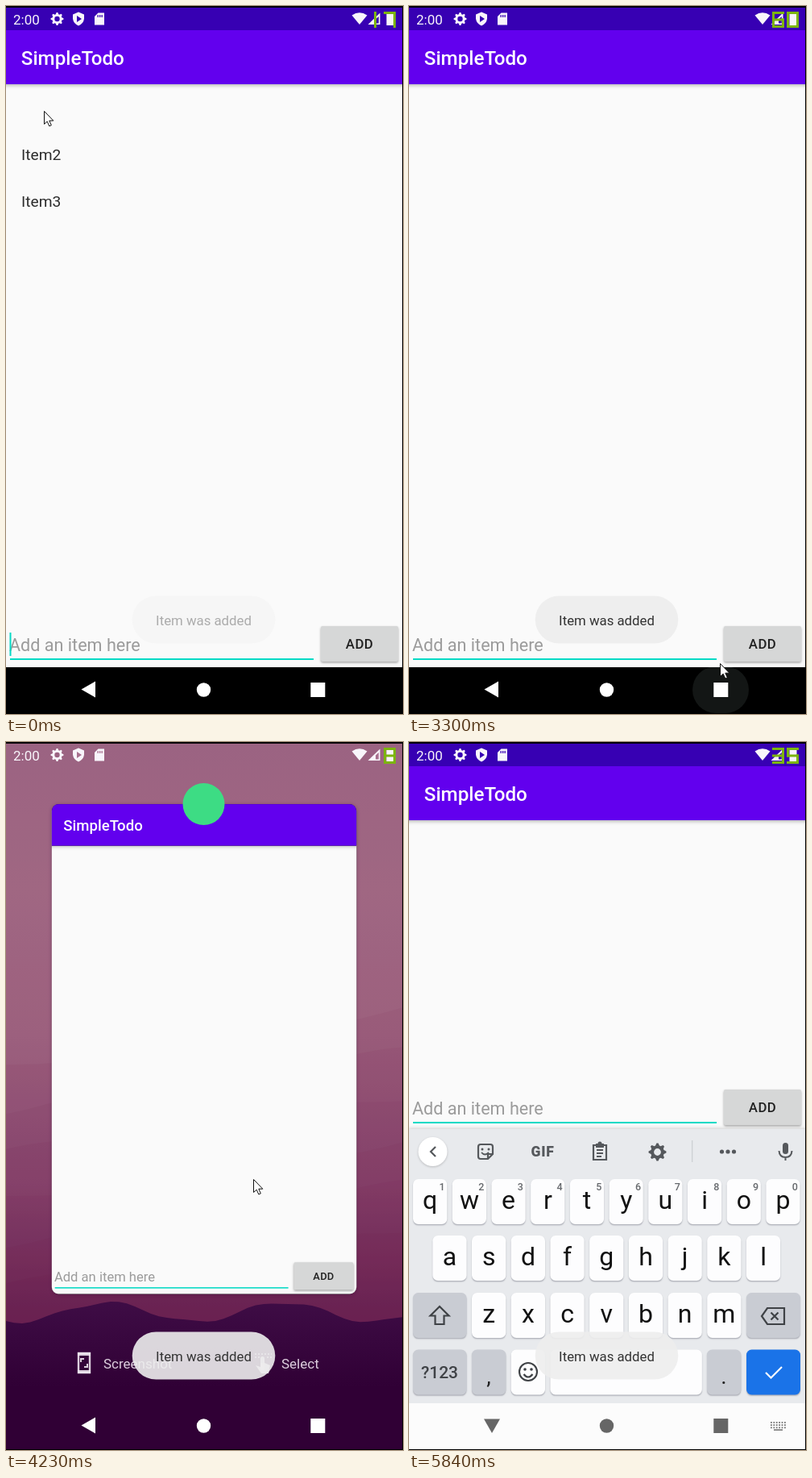
An HTML page with a canvas that plays this animation: 493 px wide and 878 px high, repeating every 5940 ms.

```html
<!DOCTYPE html>
<html lang="en">
<head>
<meta charset="utf-8">
<title>Todo list demo</title>
<style>
html, body { margin: 0; width: 100%; height: 100%; overflow: hidden; background: #000; }
canvas { display: block; }
</style>
</head>
<body>
<canvas id="stage" width="493" height="878"></canvas>
<script>
const ctx = document.getElementById('stage').getContext('2d');
// The screen refreshes in equal steps; all times below count steps.
const LOOP = 5940, STEP = 135;
const TEAL = '#03dac5', PURPLE = '#6200ee', DARK = '#3700b3', PAPER = '#fafafa', ICON = '#55585c';
const KEYS_UP = 34, ROW_UP = 35;
const COUNTS = ['17', '29', '62', '60', ' 8', '59', '35'];
// Pointer rests: first step, last step, x, y.
const RESTS = [[0, 1, 47, 130], [2, 9, 48, 125], [12, 16, 51, 128], [17, 17, 162, 280],
  [22, 26, 386, 815], [28, 34, 307, 542], [40, 40, 457, 850]];

const ramp = (n, a, b) => Math.min(1, Math.max(0, (n - a) / (b - a)));
const easeOut = u => 1 - (1 - u) ** 2;
const slide = (n, from) => 57.4 * easeOut(ramp(n, from, from + 2));
const blink = (n, from) => Math.floor((n - from) / 3.5) % 2 === 0;

// --- drawing helpers ---
function rect(x, y, w, h, color) { ctx.fillStyle = color; ctx.fillRect(x, y, w, h); }

function round(x, y, w, h, r, color) {
  ctx.beginPath(); ctx.roundRect(x, y, w, h, r);
  ctx.fillStyle = color; ctx.fill();
}

function disc(x, y, r, color) {
  ctx.beginPath(); ctx.arc(x, y, r, 0, 7);
  ctx.fillStyle = color; ctx.fill();
}

function shape(path, color) { ctx.fillStyle = color; ctx.fill(new Path2D(path)); }

function line(path, color, width = 2) {
  ctx.strokeStyle = color; ctx.lineWidth = width;
  ctx.stroke(new Path2D(path));
}

function text(str, x, y, size, color, { weight = 400, align = 'left', gap = 0 } = {}) {
  ctx.font = `${weight} ${size}px Roboto, sans-serif`;
  ctx.letterSpacing = gap + 'px';
  ctx.textAlign = align; ctx.fillStyle = color;
  ctx.fillText(str, x, y);
}

function at(x, y, draw) { ctx.save(); ctx.translate(x, y); draw(); ctx.restore(); }

function faded(alpha, draw) { ctx.save(); ctx.globalAlpha = alpha; draw(); ctx.restore(); }

function shadowed(color, blur, dy, draw) {
  ctx.save();
  ctx.shadowColor = color; ctx.shadowBlur = blur; ctx.shadowOffsetY = dy;
  draw(); ctx.restore();
}

function gear(x, y, r, color) {
  ctx.beginPath();
  for (let i = 0; i < 32; i++) {
    const a = (i - .5) * Math.PI / 16, k = i % 4 < 2 ? r : r * .76;
    ctx.lineTo(x + k * Math.cos(a), y + k * Math.sin(a));
  }
  ctx.closePath();
  ctx.moveTo(x + r * .4, y); ctx.arc(x, y, r * .4, 0, 7);
  ctx.fillStyle = color; ctx.fill('evenodd');
}

// --- status bar ---
function statusBar(under) {
  const c = '#f8f5fb';
  text('2:00', 9, 22.5, 17, c);
  gear(63.5, 16, 8, c);
  shape('M90 7.5L97 10.5V16Q96 22 90 24.5Q84 22 83 16V10.5Z', c);
  shape('M88 12L94 16L88 20Z', under);
  shape('M114.5 8.5H122V23.5H110V13Z', c);
  for (let i = 0; i < 3; i++) rect(113.5 + i * 2.5, 11, 1.3, 3, under);
  shape('M439 23L429.5 11.5Q439 5 448.5 11.5Z', c);
  shape('M464.5 8.5V23H449.5Z', c);
  shape('M462.8 13V21.5H459V16.5Z', under);
  rect(475, 8, 4, 2, c);
  rect(472.5, 9.5, 9, 14.5, c);
}

// Lit segments: 0, 3, 6 are bars from top to bottom, 1-2 and 4-5 the left and right sides.
const LIT = { 0: '012456', 2: '02346', 3: '02356', 5: '01356', 6: '013456', 7: '025', 8: '0123456', 9: '012356' };

function counter(str) {
  const c = '#7cb50e';
  [...str].forEach((d, i) => {
    const x = 451 + i * 18;
    if (d === '1') rect(457, 7, 3, 20, c);
    for (const s of LIT[d] || '') {
      const side = s % 3, y = 7 + Math.floor(s / 3) * 8.5;
      if (side) rect(x + (side - 1) * 12, y, 3, 11.5, c);
      else rect(x, y, 15, 3, c);
    }
  });
}

// --- app screen ---
function inputRow(dy, caret) {
  at(0, dy, () => {
    text('Add an item here', 4, 800, 21.6, '#9b9b9b');
    rect(5, 809, 377, 2, TEAL);
    if (caret) rect(4.5, 777, 2, 29, TEAL);
    shadowed('rgba(0,0,0,.35)', 3, 1.5, () => round(391, 769, 96, 44, 2, '#d6d7d7'));
    text('ADD', 439, 797, 16.8, '#212121', { weight: 500, align: 'center', gap: .4 });
  });
}

function app(n) {
  rect(0, 0, 493, 878, '#000');
  rect(0, 97, 493, 723, PAPER);
  shadowed('rgba(0,0,0,.25)', 4, 1.5, () => rect(-8, 30, 509, 67, PURPLE));
  rect(0, 0, 493, 30, DARK);
  text('SimpleTodo', 18.8, 73, 24.2, '#fff', { weight: 500 });
  const ink = '#2c2c2c';
  faded(1 - ramp(n, 7, 9), () => text('Item2', 19, 191 - slide(n, 0), 19.2, ink));
  if (n < 16) text('Item3', 19, 248.5 - slide(n, 0) - slide(n, 8), 19.2, ink);
  if (n < KEYS_UP) inputRow(0, n < 24 && blink(n, -1));
  else if (n >= ROW_UP) inputRow(-338, !blink(n, 36));
}

// --- system navigation ---
function navIcons(color, turn) {
  at(103, 847.5, () => {
    ctx.rotate(turn);
    shape('M-9.5 0L8 -10V10Z', color);
  });
  disc(245.5, 848, 8.7, color);
  rect(378.3, 839, 18, 18, color);
}

// --- task switcher ---
function wave(y, color) {
  ctx.beginPath(); ctx.moveTo(0, 878);
  for (let x = 0; x <= 500; x += 10) ctx.lineTo(x, y(x));
  ctx.lineTo(500, 878);
  ctx.fillStyle = color; ctx.fill();
}

function fade(y0, y1, colors) {
  const g = ctx.createLinearGradient(0, y0, 0, y1);
  colors.forEach((c, i) => g.addColorStop(i / (colors.length - 1), c));
  return g;
}

function wallpaper(dim) {
  rect(0, 0, 493, 878, fade(0, 730, ['#be7c9f', '#c4809f', '#bf7899', '#a95f8c', '#7f346c']));
  for (let i = 0; i < 6; i++) {
    wave(x => 400 + i * 55 - x / 7 + 7 * Math.sin(x / 52 + i * 2), 'rgba(110,0,60,.05)');
  }
  rect(0, 0, 493, 878, `rgba(16,0,16,${dim})`);
  const ridge = x => 707 - 12 * Math.cos((x - 125) * Math.PI / 110) + 2 * Math.sin(x / 13);
  wave(ridge, fade(690, 800, ['#3f0d46', '#300035']));
}

function actions() {
  const c = '#eee6ef';
  at(97, 770, () => {
    line('M-7 -12H7V12H-7Z', c, 2.4);
    rect(-8, -13, 16, 4, c); rect(-8, 9, 16, 4, c);
    line('M-4 -1V-5H0M4 1V5H0', c, 2);
  });
  text('Screenshot', 121, 776.5, 17, c);
  at(319, 770, () => {
    round(-3, -8, 5, 17, 2.5, c);
    shape('M-9 3L-3 5V0H2L9 3L7 13H-2Z', c);
    ctx.setLineDash([2, 2]);
    line('M-10 -11H11M-10 -7H-4M5 -7H11', c, 1.5);
  });
  text('Select', 342, 776.5, 17, c);
}

function recents(n, p) {
  const open = n < 32;
  wallpaper(.2 * ramp(n, 26, 27));
  if (open) faded(.9 * ramp(n, 24, 27), actions);
  const s = 1 - .231 * p, top = 30 * p, height = 878 - 88 * p;
  at(246 * (1 - s), 54 * p ** 1.1, () => {
    ctx.scale(s, s);
    shadowed('rgba(40,0,40,.35)', 5, 1, () => round(0, top, 492, height, 11 * p, PAPER));
    ctx.beginPath(); ctx.roundRect(0, top, 492, height, 11 * p); ctx.clip();
    app(n);
  });
  if (open) faded(ramp(n, 27, 29), () => disc(245.5, 77, 26, '#3ddc84'));
}

// --- keyboard ---
function key(x, y, w, color = '#fdfdfe') {
  shadowed('rgba(60,64,80,.35)', 1.5, 1.3, () => round(x, y, w, 56, 6.5, color));
}

function letters(row, x0, y, hints) {
  [...row].forEach((ch, i) => {
    const x = x0 + i * 48.7;
    key(x, y, 42.3);
    text(ch, x + 21.2, y + 37.3, 32, '#111', { align: 'center' });
    if (hints) text((i + 1) % 10, x + 36, y + 14, 12.5, '#66696d', { weight: 500, align: 'center' });
  });
}

function toolRow() {
  shadowed('rgba(0,0,0,.2)', 3, 1, () => disc(29.5, 508, 18, '#fff'));
  line('M33 502L27 508L33 514', ICON, 2.2);
  at(95, 508, () => {
    line('M-6 -9H6Q9 -9 9 -6V3L3 9H-6Q-9 9 -9 6V-6Q-9 -9 -6 -9M9 3H3V9', ICON, 2.2);
    line('M-5 1Q-1 6 4 1', ICON, 1.8);
    disc(-4, -3, 1.5, ICON); disc(4, -3, 1.5, ICON);
  });
  text('GIF', 166, 514, 17.5, ICON, { weight: 900, align: 'center', gap: .8 });
  at(237, 508, () => {
    line('M-8 -8H8V10H-8Z', ICON, 2.2);
    rect(-5, -10, 10, 5, ICON); disc(0, -10, 2.5, ICON);
    line('M-4 -2H4M-4 2H4M-4 6H2', ICON, 1.8);
  });
  gear(308.5, 508.5, 11, ICON);
  rect(351, 494, 1.3, 27, '#cdd0d4');
  for (let i = 0; i < 3; i++) disc(388.5 + i * 7.5, 508, 2.6, ICON);
  round(464, 497, 7, 14, 3.5, ICON);
  line('M459.5 507Q460 515 467.5 515T475.5 507M467.5 515V519', ICON, 2);
}

function keyboard() {
  const grey = '#c9ccd3', ink = '#3f4246';
  shadowed('rgba(0,0,0,.18)', 4, -1, () => rect(0, 480, 493, 340, '#e8eaed'));
  toolRow();
  letters('qwertyuiop', 5, 542, true);
  letters('asdfghjkl', 29.3, 612);
  letters('zxcvbnm', 78, 683);
  key(5, 683, 66.5, grey);
  line('M38 700L26.5 711.5H32.5V722H43.5V711.5H49.5Z', ink, 2.2);
  key(419, 683, 67, grey);
  line('M445 702H466V722H445L438 712ZM449.5 707.5L458.5 716.5M458.5 707.5L449.5 716.5', ink, 2.2);
  key(5, 753.5, 66.5, grey);
  text('?123', 38, 789, 21, ink, { weight: 500, align: 'center' });
  key(78, 753.5, 42.3, grey);
  text(',', 99, 796, 28, '#222', { align: 'center' });
  key(126.7, 753.5, 42.3);
  line('M159 781a11 11 0 1 0 -22 0a11 11 0 1 0 22 0M142.5 784Q148 791 153.5 784', ink, 2.1);
  disc(144, 778, 1.8, ink); disc(152, 778, 1.8, ink);
  key(175.4, 753.5, 188.5);
  key(370, 753.5, 42.3, grey);
  text('.', 391, 796, 28, '#222', { align: 'center' });
  key(419, 753.5, 67, '#1a73e8');
  line('M443 782L449.5 788.5L463 775', '#fff', 2.2);
  rect(0, 820, 493, 58, '#fcfcfc');
  for (let i = 0; i < 18; i++) rect(449 + i % 6 * 3.4, 843 + Math.floor(i / 6) * 3.2, 1.8, 1.8, '#777');
  rect(453, 852.3, 11, 1.6, '#777');
}

function toast() {
  round(156.7, 731.4, 177.6, 59.2, 29.6, 'rgba(238,238,238,.9)');
  text('Item was added', 245.5, 768, 16.8, '#333', { align: 'center' });
}

function pointer(x, y) {
  at(x + .5, y + .5, () => {
    const arrow = 'M0 0V16L3.7 12.7L6.3 18.5L8.8 17.4L6.3 11.7H11.3Z';
    shape(arrow, '#fff');
    line(arrow, '#111', 1);
  });
}

function draw(n) {
  const p = ramp(n, 24.28, 27) - ramp(n, 31, 32.24), typing = n >= KEYS_UP;
  rect(0, 0, 493, 878, '#000');
  ctx.save();
  ctx.beginPath(); ctx.rect(0, 2, 492, 875); ctx.clip();
  if (p > 0) recents(n, p); else app(n);
  statusBar(p > 0 ? '#a8708e' : DARK);
  if (typing) keyboard();
  if (n >= 22 && n < 27) {
    const half = 35 + 29 * ramp(n, 24, 25);
    round(387 - half, 819, half * 2, 58, 29, 'rgba(150,170,160,.13)');
  }
  const glow = 1 - .4 * (ramp(n, 1, 9) - ramp(n, 21, 24));
  navIcons(typing ? '#666' : `rgba(255,255,255,${glow})`, -Math.PI / 2 * ramp(n, 33, 34.2));
  faded(.38 + .62 * ramp(n, 0, 2), toast);
  counter(COUNTS[Math.floor((n + 4.65) / 7.2)]);
  const rest = RESTS.find(([from, to]) => n >= from && n <= to);
  if (rest) pointer(rest[2], rest[3]);
  ctx.restore();
}

const start = performance.now();
function tick() {
  draw(Math.floor((performance.now() - start) % LOOP / STEP));
  requestAnimationFrame(tick);
}
tick();
</script>
</body>
</html>
```
